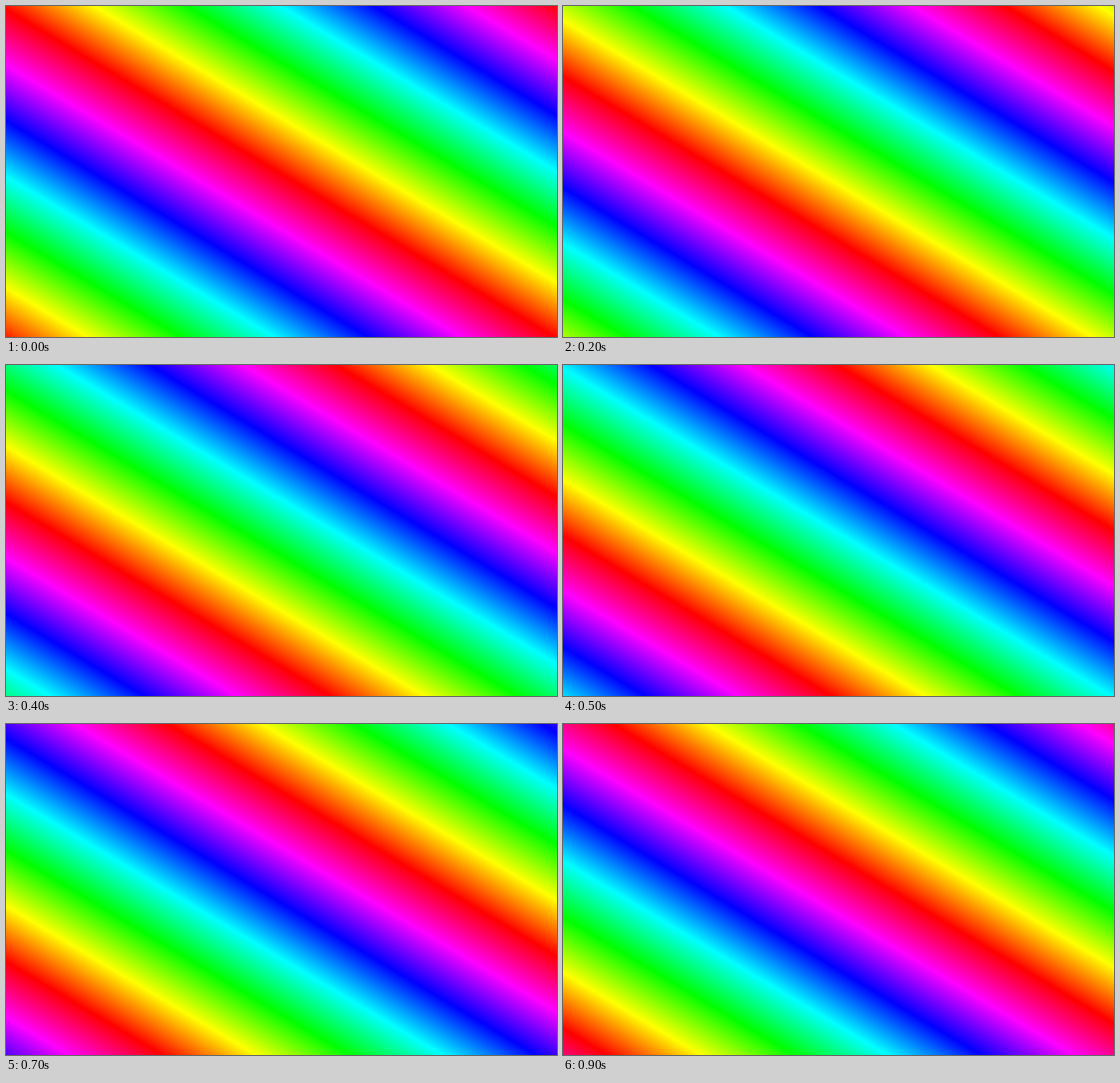
An HTML page with a canvas that plays this animation: 966 px wide and 580 px high, repeating every 1 s.

```html
<!DOCTYPE html>
<html lang="en">
<head>
<meta charset="utf-8">
<title>Rainbow</title>
<style>
html, body { margin: 0; width: 100%; height: 100%; overflow: hidden; }
canvas { display: block; width: 100%; height: 100%; }
</style>
</head>
<body>
<canvas width="966" height="580"></canvas>
<script>
const canvas = document.querySelector('canvas');
const ctx = canvas.getContext('2d');
const PERIOD = 586;   // vertical distance between equal hues
const SLOPE = 0.597;  // fall of the bands per pixel
const START = 5.9;    // height of the red band at the left edge
const STEPS = 10, STEP_MS = 100;

// One full turn of hue, perpendicular to the bands
const turn = PERIOD / (1 + SLOPE * SLOPE);
const vx = SLOPE * turn, vy = -turn;
let shown = -1;

function draw(step) {
  const y = START + PERIOD * step / STEPS;
  const rainbow = ctx.createLinearGradient(-vx, y - vy, 2 * vx, y + 2 * vy);
  for (let i = 0; i <= 18; i++) {
    rainbow.addColorStop(i / 18, `hsl(${i % 6 * 60}, 100%, 50%)`);
  }
  ctx.fillStyle = rainbow;
  ctx.fillRect(0, 0, canvas.width, canvas.height);
}

function tick() {
  const step = Math.floor(performance.now() / STEP_MS) % STEPS;
  if (step !== shown) draw(shown = step);
  requestAnimationFrame(tick);
}
tick();
</script>
</body>
</html>
```
